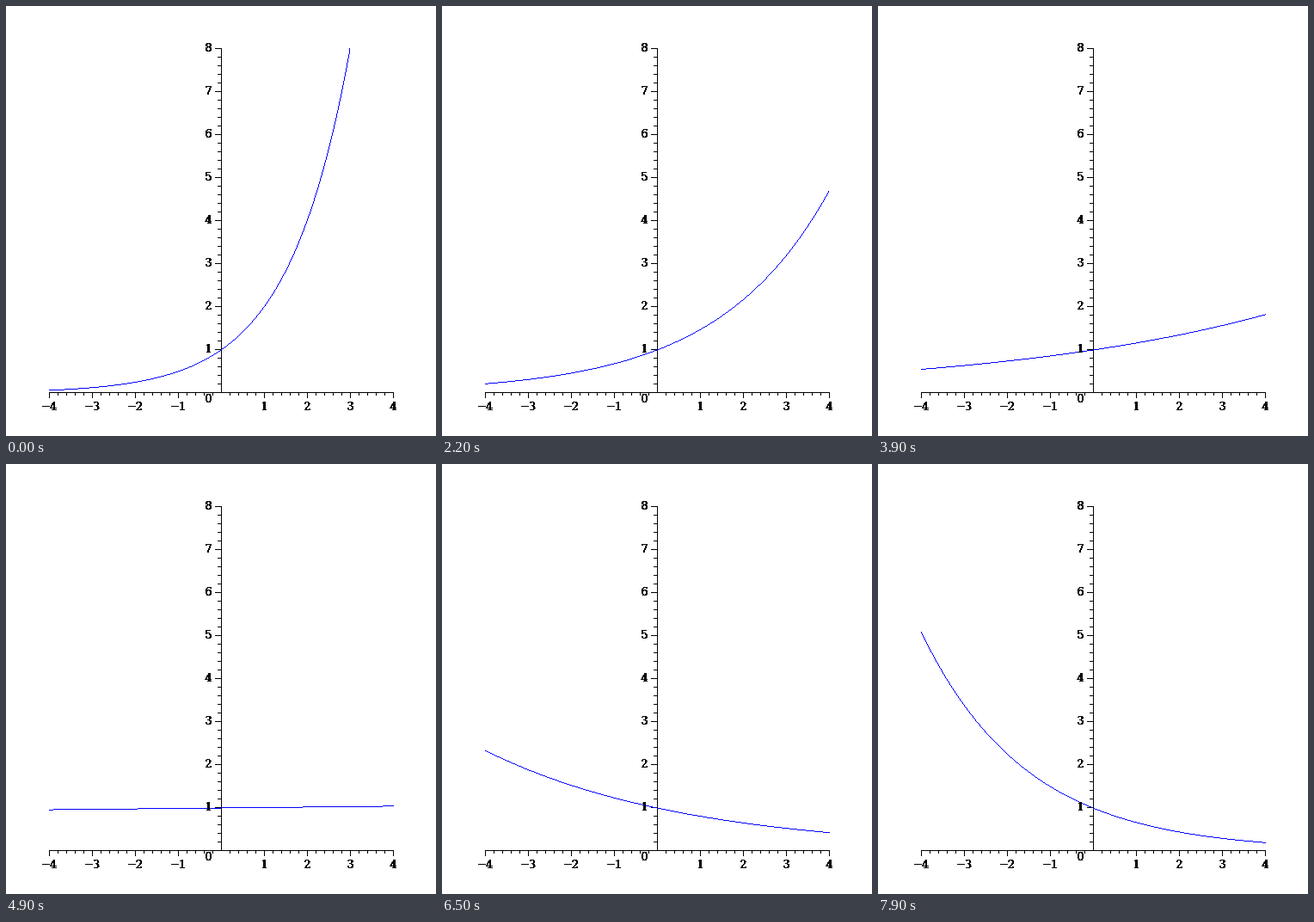
Animation, 500 px wide and 500 px high, one loop 8000 ms. Source, as a matplotlib script:

```python
import matplotlib.pyplot as plt
import numpy as np
from matplotlib.animation import FuncAnimation
from matplotlib.collections import PolyCollection

SIZE, DPI = 500, 100
FRAMES, INTERVAL = 80, 100
UNIT = 50               # pixels per axis unit
OX, OY = 250, 449       # pixel holding the origin
X_MAX, Y_MAX = 4, 8
LEFT, RIGHT, TOP = OX - X_MAX * UNIT, OX + X_MAX * UNIT, OY - Y_MAX * UNIT
FONT = 12.5 * 72 / DPI

fig = plt.figure(figsize=(SIZE / DPI, SIZE / DPI), dpi=DPI, facecolor="white")
ax = fig.add_axes([0, 0, 1, 1])
ax.set_xlim(0, SIZE)
ax.set_ylim(SIZE, 0)
ax.axis("off")


def bar(x, y, w, h):
    """Fill a black block of whole pixels."""
    ax.add_patch(plt.Rectangle((x, y), w, h, facecolor="black",
                               linewidth=0, antialiased=False))


def label(x, y, value):
    """Write a number, struck twice for heavier stems."""
    text = str(value).replace("-", "\u2212")
    for dx in (-0.5, 0.5):
        ax.text(x + dx, y, text, family="DejaVu Serif", size=FONT,
                color="black", ha="center", va="baseline", antialiased=False)


def draw_axes():
    bar(LEFT, OY, RIGHT - LEFT + 1, 1)
    bar(OX, TOP, 1, OY - TOP + 1)
    for k in range(-5 * X_MAX, 5 * X_MAX + 1):
        if k == 0:
            continue
        major = k % 5 == 0
        x = OX + k * UNIT // 5
        bar(x, OY, 1, 7 if major else 4)
        if major:
            label(x + 0.5, 470, k // 5)
    for k in range(1, 5 * Y_MAX + 1):
        major = k % 5 == 0
        y = OY - k * UNIT // 5
        length = 7 if major else 4
        bar(OX - length, y, length, 1)
        if major:
            label(235.5, y + 4, k // 5)
    label(235.5, 461, 0)


def curve_pixels(rate):
    """Pixels of y = exp(rate * x), one per column or, if steep, per row."""
    cols = np.arange(LEFT, RIGHT + 1)
    x = np.minimum((cols + 0.5 - OX) / UNIT, X_MAX)
    y = np.exp(rate * x)
    flat = (abs(rate) * y <= 1) & (y <= Y_MAX)
    pixels = [np.column_stack([cols, OY - np.floor(UNIT * y)])[flat]]
    if rate:
        rows = np.arange(TOP, OY)
        y = np.minimum((OY - rows + 0.5) / UNIT, Y_MAX - 1e-6)
        x = np.log(y) / rate
        steep = (abs(rate) * y > 1) & (abs(x) <= X_MAX)
        pixels.append(np.column_stack([np.floor(OX + UNIT * x), rows])[steep])
    return np.vstack(pixels)


draw_axes()
square = np.array([[0, 0], [1, 0], [1, 1], [0, 1]])
curve = PolyCollection([], facecolor="#0000ff", linewidth=0,
                       antialiased=False, zorder=2)
ax.add_collection(curve, autolim=False)


def update(i):
    # the exponent of the base falls at a steady rate
    rate = np.log(2) * (1 - 4 * i / 199)
    curve.set_verts(curve_pixels(rate)[:, None, :] + square)
    return curve,


anim = FuncAnimation(fig, update, frames=FRAMES, interval=INTERVAL,
                     repeat=True, repeat_delay=0, blit=False)
plt.show()
```
